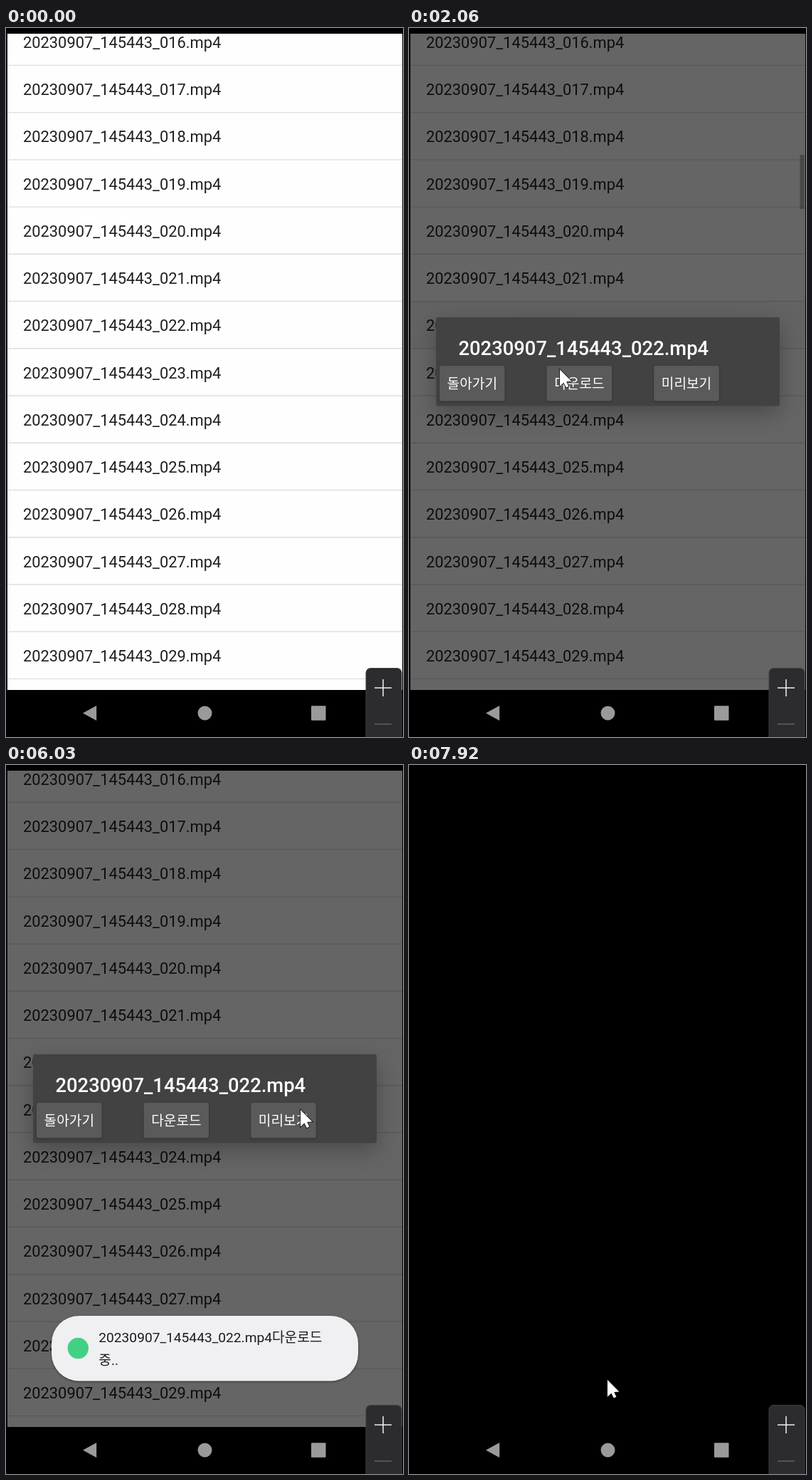
Animation of 558x995 px, one loop 7990 ms. Source, as an HTML page with a canvas:

```html
<!DOCTYPE html>
<html lang="ko">
<head>
<meta charset="utf-8">
<style>
  html, body { margin: 0; width: 100%; height: 100%; overflow: hidden; background: #000; }
  canvas { display: block; }
</style>
</head>
<body>
<canvas id="stage" width="558" height="995"></canvas>
<script>
const ctx = document.getElementById('stage').getContext('2d');
const LOOP = 7990;
const FONTS = 'Roboto, "Noto Sans CJK KR", "Noto Sans CJK", sans-serif';
const FILE = '20230907_145443_';
const ROW = 66.23, FIRST_LINE = 52.3;
const CENTER = { x: 279.5, y: 497 };
const sp = size => size * 1.369;

const PRESS = { row: 1130, download: 3320, preview: 6540 };
const DIALOG = 1650, TOAST = 4590, OPEN = 7060;

const clamp = v => Math.max(0, Math.min(1, v));
const ramp = (t, start, length) => clamp((t - start) / length);
const pulse = (t, start, end, fade) => ramp(t, start, fade) * (1 - ramp(t, end, fade));
const easeOut = p => 1 - (1 - p) ** 3;
const black = alpha => `rgba(0,0,0,${alpha})`;

function box(x, y, w, h, color, radius = 0) {
  ctx.fillStyle = color;
  ctx.beginPath();
  ctx.roundRect(x, y, w, h, radius);
  ctx.fill();
}

const screen = color => box(2, 8, 555, 987, color);

function disc(x, y, r, color) {
  ctx.fillStyle = color;
  ctx.beginPath();
  ctx.arc(x, y, r, 0, 2 * Math.PI);
  ctx.fill();
}

function text(string, x, y, size, color, weight = 400, align = 'left') {
  ctx.font = `${weight} ${size}px ${FONTS}`;
  ctx.textAlign = align;
  ctx.fillStyle = color;
  ctx.fillText(string, x, y);
}

function shadowed(blur, offset, alpha, draw) {
  ctx.save();
  ctx.shadowColor = black(alpha);
  ctx.shadowBlur = blur;
  ctx.shadowOffsetY = offset;
  draw();
  ctx.restore();
}

function scaled(factor, draw) {
  ctx.save();
  ctx.translate(CENTER.x, CENTER.y);
  ctx.scale(factor, factor);
  ctx.translate(-CENTER.x, -CENTER.y);
  draw();
  ctx.restore();
}

function drawRowRipple(t) {
  const strength = pulse(t, PRESS.row + 170, 1920, 200);
  const ripple = ctx.createRadialGradient(194, 403, 0, 194, 403, 360);
  ripple.addColorStop(0, black(0.13 * strength));
  ripple.addColorStop(1, black(0.08 * strength));
  box(2, FIRST_LINE + 5 * ROW, 555, ROW, ripple);
}

function drawList(t) {
  box(2, 8, 555, 921, '#fefefe');
  drawRowRipple(t);
  for (let i = 0; i < 14; i++) {
    const line = FIRST_LINE + i * ROW;
    box(2, line - 0.6, 555, 1.4, '#dedede');
    text(`${FILE}0${16 + i}.mp4`, 23.9, line - 24.3, sp(16), '#202020');
  }
  box(549.5, 178, 6, 76, black(0.27 * pulse(t, 1540, 2120, 220)));
}

function drawButton(x, label, glow) {
  shadowed(3, 1, 0.3, () => box(x, 474, 91.5, 49.5, '#5a5a5b', 3));
  box(x, 474, 91.5, 49.5, `rgba(190,195,200,${0.28 * glow})`, 3);
  text(label, x + 45.8, 505.7, sp(14), '#fff', 400, 'center');
}

function drawDialog(t) {
  ctx.globalAlpha = ramp(t, DIALOG, 120);
  shadowed(30, 10, 0.27, () => box(38, 406, 483, 124.5, '#424242', 3));
  text(`${FILE}022.mp4`, 69.5, 459.3, sp(20), '#fff', 500);
  const glows = [0, pulse(t, PRESS.download + 30, 4050, 220), 0.8 * ramp(t, PRESS.preview, 220)];
  ['돌아가기', '다운로드', '미리보기'].forEach((label, i) => drawButton(43 + 150.6 * i, label, glows[i]));
  ctx.globalAlpha = 1;
}

function drawToast(t) {
  ctx.globalAlpha = pulse(t, TOAST, TOAST + 2000, 120);
  shadowed(3, 1, 0.5, () => box(64, 773, 431, 91.5, '#f0eff2', 38.5));
  disc(101.3, 818.5, 14.7, '#42d184');
  text(`${FILE}022.mp4다운로드`, 130.3, 809.8, sp(14), '#1c1c1e');
  text('중..', 130.3, 842, sp(14), '#1c1c1e');
  ctx.globalAlpha = 1;
}

// The old window grows while a black one expands and fades in over it.
function drawScreen(t) {
  const zoom = 1 + Math.max(0, t - OPEN) * 0.000207;
  const grown = 1 - 0.15 * (1 - ramp(t, OPEN, 432)) ** 2;
  const cover = ramp(t, OPEN, 265);
  ctx.save();
  ctx.beginPath();
  ctx.rect(2, 8, 555, 987);
  ctx.clip();
  scaled(zoom, () => drawList(t));
  screen(black(0.6 * ramp(t, DIALOG, 217) * (1 - ramp(t, OPEN, 360))));
  scaled(zoom, () => drawDialog(t));
  drawToast(t);
  scaled(grown, () => screen(black(cover)));
  if (cover === 1) screen('#000');
  ctx.restore();
}

function drawNavigation() {
  ctx.fillStyle = '#9a9a9a';
  ctx.fill(new Path2D('M108 961.5L127.2 951V972Z'));
  disc(279.5, 961.5, 10, '#9a9a9a');
  box(429, 951.3, 20.5, 20.5, '#9a9a9a', 1);
}

function drawZoomPanel() {
  box(505.5, 898, 51, 110, '#404042', 7);
  box(506.5, 899, 49, 110, '#2c2c2e', 6);
  box(518, 925.3, 24, 1.5, '#f2f2f2');
  box(529.3, 914, 1.5, 24, '#f2f2f2');
  box(518, 976.2, 24, 1.3, '#69696b');
}

// Each glide runs evenly across while the height settles early.
function pointerAt(t) {
  let x = 550, y = 975;
  const glide = (start, end, toX, toY) => {
    const p = ramp(t, start, end - start);
    x += (toX - x) * p;
    y += (toY - y) * easeOut(p);
  };
  glide(200, 1060, 194, 403);
  glide(1850, 2480, 248, 511);
  glide(5520, 6000, 414, 484);
  glide(6240, PRESS.preview, 399.5, 503.5);
  glide(7200, 7920, 279, 863);
  return [x, y];
}

const ARROW = new Path2D('M0 0V23.5L5.4 18.6L8.8 25.3L12.3 23.8L9.2 17L16.3 16.6Z');

function drawPointer(t) {
  if (t < 200) return;
  ctx.save();
  ctx.translate(...pointerAt(t));
  ctx.strokeStyle = '#111';
  ctx.lineWidth = 1.7;
  ctx.stroke(ARROW);
  ctx.fillStyle = '#fff';
  ctx.fill(ARROW);
  const pressed = Object.values(PRESS).some(start => t >= start && t < start + 220);
  if (pressed) disc(0, -0.5, 18, 'rgba(255,255,0,0.5)');
  ctx.restore();
}

function frame() {
  const t = performance.now() % LOOP;
  box(0, 0, 558, 995, '#000');
  drawScreen(t);
  drawNavigation();
  drawZoomPanel();
  drawPointer(t);
  requestAnimationFrame(frame);
}
frame();
</script>
</body>
</html>
```
